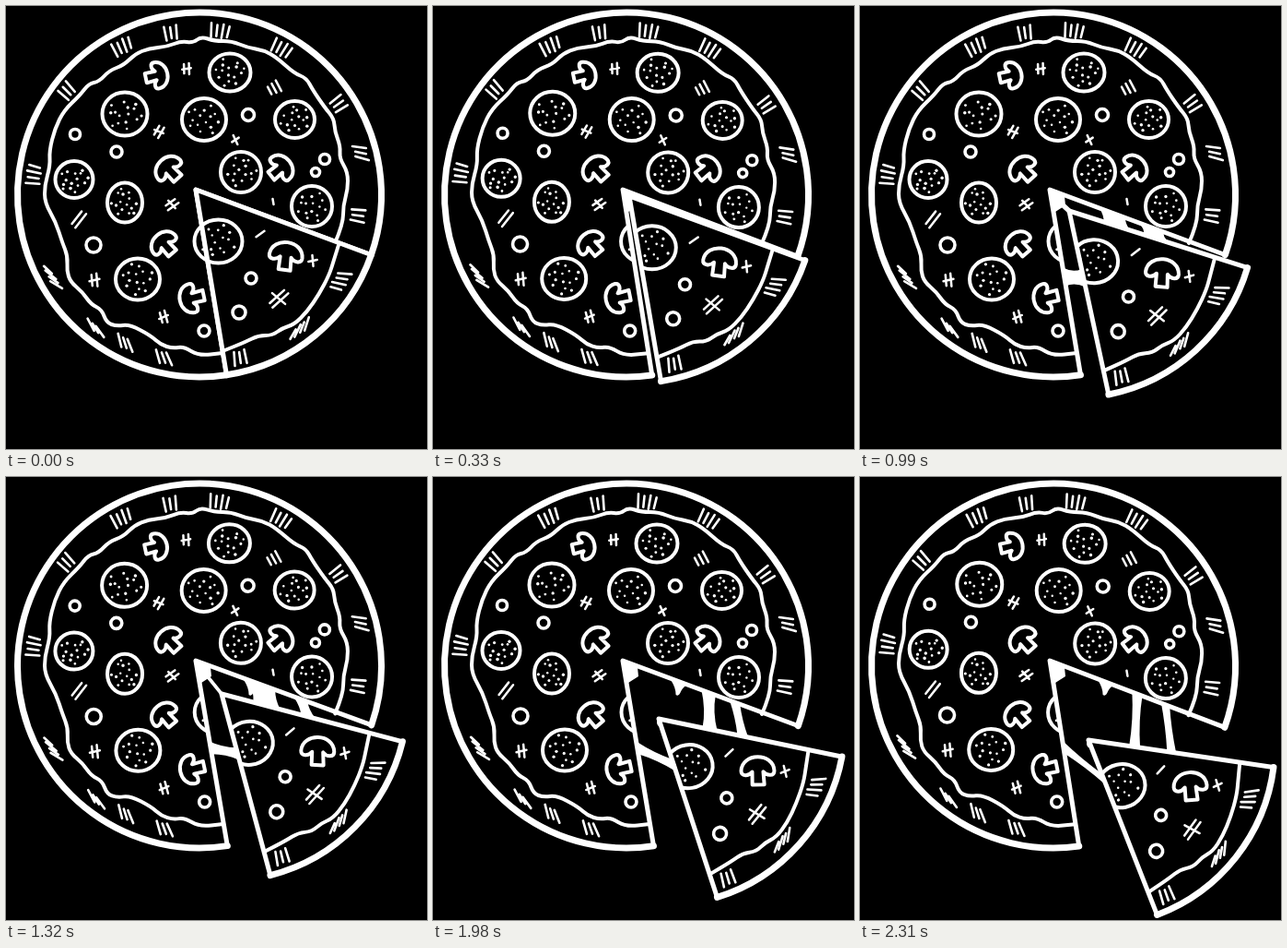
Recreate the animation shown at these times as an HTML page with a canvas. Size 457 px wide and 480 px high, loop 2640 ms.

```html
<!DOCTYPE html>
<html lang="en">
<head>
<meta charset="utf-8">
<title>Pizza slice</title>
<style>
html, body { margin: 0; width: 100%; height: 100%; overflow: hidden; background: #000; }
canvas { display: block; width: 457px; height: 480px; }
</style>
</head>
<body>
<canvas id="stage" width="457" height="480"></canvas>
<script>
const ctx = document.getElementById('stage').getContext('2d');
const STEP = 330, POSES = 8, TAU = Math.PI * 2, RAD = Math.PI / 180;
const C = [210, 204.5], R = 197.5;
const TIP = [206, 199], RIGHT = [396, 269.5], LOW = [239.5, 400];
const A_RIGHT = Math.atan2(RIGHT[1] - C[1], RIGHT[0] - C[0]);
const A_LOW = Math.atan2(LOW[1] - C[1], LOW[0] - C[0]);

// slice tip x, y, slice turn, pizza wobble (degrees)
const pose = [
  [206, 199, 0, 0], [213, 206, -0.3, 0.5], [219, 214, -1.3, -0.25], [227, 222, -2.7, 0],
  [234, 235, -5.6, -0.25], [240, 248, -7, 0], [245, 262, -8.7, 0], [248, 285, -12, 0.5]
];

const crustBody = [
  [357, 257], [366, 236], [366, 216], [371, 199], [371, 180], [362, 165], [363, 152], [357, 136],
  [356, 122], [346, 110], [333, 91], [326, 78], [313, 73], [294, 56], [280, 48], [262, 45],
  [245, 38], [226, 38], [212, 33], [203, 40], [190, 38], [175, 44], [155, 46], [140, 52],
  [128, 64], [112, 70], [101, 82], [90, 84], [80, 97], [63, 113], [53, 133], [47, 157],
  [48, 173], [42, 194], [42, 213], [54, 234], [61, 256], [67, 271], [66, 287], [70, 299],
  [83, 310], [92, 323], [104, 329], [109, 343], [120, 347], [134, 345], [157, 357], [168, 367],
  [181, 371], [193, 369], [209, 379], [235, 376]
];
const crustSlice = [
  [361, 259], [356, 275], [351, 291], [340, 312], [327, 331], [313, 345], [300, 349],
  [289, 357], [274, 357], [260, 364], [235, 374]
];

// x, y, rx, ry
const pepperoni = [
  [129, 117, 24.5, 23.5], [215, 123, 24, 23], [243, 72, 22.5, 20.5], [313.5, 123, 21.5, 20],
  [255, 180, 22, 22], [332, 217, 22, 22], [74, 188, 20.5, 20], [129, 213, 19, 21.5],
  [143, 296, 24, 22.5], [230.5, 255, 26, 23.5]
];
// x, y, radius
const rings = [
  [75, 139, 5.5], [120, 158, 6], [263, 118, 6.5], [346, 166, 5.5], [336, 180, 4.5],
  [95, 259, 8], [215, 352, 6], [266, 295, 6], [253, 332, 7]
];
// x, y, turn, scale
const mushrooms = [
  [165, 75, 78, 0.8], [176, 176, -42, 0.88], [299, 175, 52, 0.85],
  [171, 257, -40, 0.85], [200, 317, -102, 0.88], [304, 269, 8, 1]
];
// x, y, stroke angle, count
const ticks = [
  [126, 44, 66, 4], [179, 29, 82, 3], [232, 27, 96, 4], [299, 46, 118, 4], [66, 92, 45, 3],
  [361, 106, 145, 3], [385, 159, 12, 3], [382, 227, 8, 3], [30, 183, 8, 4], [50, 294, 35, 4],
  [97, 349, 58, 3], [129, 365, 72, 3], [171, 381, 70, 3],
  [363, 298, 8, 4], [319, 350, 112, 4], [254, 381, 82, 3]
];
// x, y, stroke angle, count, length, crossed
const herbs = [
  [196, 68, 88, 2, 12, 1], [291, 89, 62, 3, 13, 0], [166, 136, 120, 2, 13, 1],
  [249, 145, 65, 1, 11, 1], [180, 215, 145, 2, 14, 1], [79, 231, 128, 2, 19, 0],
  [96, 297, 85, 2, 14, 1], [171, 337, 75, 2, 13, 1], [290, 212, 80, 1, 6, 0],
  [276, 247, 145, 1, 11, 0], [333, 276, 85, 1, 12, 1], [296, 317, 138, 2, 23, 1]
];

function rng(seed) {
  return () => (seed = (seed * 16807) % 2147483647) / 2147483647;
}

function stroke(width, build) {
  ctx.lineWidth = width;
  ctx.beginPath();
  build();
  ctx.stroke();
}

function curve(pts) {
  ctx.moveTo(...pts[0]);
  for (let i = 1; i < pts.length - 1; i++) {
    const [x, y] = pts[i], [u, v] = pts[i + 1];
    ctx.quadraticCurveTo(x, y, (x + u) / 2, (y + v) / 2);
  }
  ctx.lineTo(...pts[pts.length - 1]);
}

function dash(x, y, angle, len) {
  const dx = Math.cos(angle * RAD) * len / 2, dy = Math.sin(angle * RAD) * len / 2;
  ctx.moveTo(x - dx, y - dy);
  ctx.lineTo(x + dx, y + dy);
}

function drawPepperoni([x, y, rx, ry], i) {
  stroke(4, () => ctx.ellipse(x, y, rx, ry, 0, 0, TAU));
  const rand = rng(977 * (i + 3));
  for (let n = 0; n < 15; n++) {
    const a = n * 2.4 + rand() * 0.6 + i, d = Math.sqrt((n + 0.6) / 15) * 0.78;
    ctx.beginPath();
    ctx.arc(x + Math.cos(a) * d * rx, y + Math.sin(a) * d * ry, 1.2 + rand() * 0.6, 0, TAU);
    ctx.fill();
  }
}

function drawMushroom([x, y, turn, s]) {
  ctx.save();
  ctx.translate(x, y);
  ctx.rotate(turn * RAD);
  ctx.scale(s, s);
  stroke(4 / s, () => {
    ctx.moveTo(-18, 2);
    ctx.bezierCurveTo(-17, -18, 17, -18, 18, 2);
    ctx.bezierCurveTo(18, 8, 10, 8, 6, 3);
    ctx.lineTo(7, 17);
    ctx.lineTo(-6, 17);
    ctx.lineTo(-6, 3);
    ctx.bezierCurveTo(-10, 8, -18, 8, -18, 2);
    ctx.closePath();
  });
  ctx.restore();
}

function drawTicks([x, y, angle, n]) {
  const out = Math.atan2(y - C[1], x - C[0]);
  stroke(2.6, () => {
    for (let i = 0; i < n; i++) {
      const k = (i - (n - 1) / 2) * 6.2;
      dash(x - Math.sin(out) * k, y + Math.cos(out) * k, angle + (i - 1) * 4, 15 - (i % 2) * 3);
    }
  });
}

function drawHerb([x, y, angle, n, len, crossed]) {
  stroke(2.5, () => {
    for (let i = 0; i < n; i++) {
      const k = (i - (n - 1) / 2) * 5.5;
      dash(x - Math.sin(angle * RAD) * k, y + Math.cos(angle * RAD) * k, angle, len - i * 2);
    }
    if (crossed) dash(x, y, angle + 82, len * 0.8);
  });
}

function toppings() {
  pepperoni.forEach(drawPepperoni);
  rings.forEach(([x, y, r]) => stroke(3.6, () => ctx.arc(x, y, r, 0, TAU)));
  mushrooms.forEach(drawMushroom);
  ticks.forEach(drawTicks);
  herbs.forEach(drawHerb);
}

function wedge() {
  ctx.moveTo(...RIGHT);
  ctx.lineTo(...TIP);
  ctx.lineTo(...LOW);
}

function sector() {
  wedge();
  ctx.arc(...C, R, A_LOW, A_RIGHT, true);
  ctx.closePath();
}

function drawBody(wobble) {
  ctx.save();
  ctx.translate(...C);
  ctx.rotate(wobble * RAD);
  ctx.translate(-C[0], -C[1]);
  ctx.save();
  ctx.beginPath();
  ctx.rect(0, 0, 457, 480);
  sector();
  ctx.clip('evenodd');
  toppings();
  ctx.restore();
  stroke(4, () => curve(crustBody));
  stroke(7, () => ctx.arc(...C, R, A_LOW, A_RIGHT + TAU));
  stroke(5, wedge);
  ctx.restore();
}

function drawSlice([x, y, turn]) {
  ctx.save();
  ctx.translate(x, y);
  ctx.rotate(turn * RAD);
  ctx.translate(-TIP[0], -TIP[1]);
  ctx.save();
  ctx.beginPath();
  sector();
  ctx.clip();
  ctx.fillStyle = '#000';
  ctx.fillRect(150, 150, 300, 300);
  ctx.fillStyle = '#fff';
  toppings();
  stroke(4, () => curve(crustSlice));
  ctx.restore();
  stroke(5, wedge);
  stroke(7, () => ctx.arc(...C, R, A_LOW, A_RIGHT, true));
  ctx.restore();
}

function along(a, b, t) {
  return [a[0] + (b[0] - a[0]) * t, a[1] + (b[1] - a[1]) * t];
}

function onSlice(p, [x, y, turn]) {
  const c = Math.cos(turn * RAD), s = Math.sin(turn * RAD);
  const dx = p[0] - TIP[0], dy = p[1] - TIP[1];
  return [x + dx * c - dy * s, y + dx * s + dy * c];
}

// cheese pulled between the two cut edges, thin in the middle
function strand(end, t, u, half, neck, p) {
  const len = Math.hypot(end[0] - TIP[0], end[1] - TIP[1]), w = half / len;
  const a = along(TIP, end, t - w), b = along(TIP, end, t + w);
  const c = onSlice(along(TIP, end, u + w), p), d = onSlice(along(TIP, end, u - w), p);
  const mid = (m, n, o, q) => along(along(m, n, 0.5), along(o, q, 0.5), (1 - neck) / 2);
  ctx.beginPath();
  ctx.moveTo(...a);
  ctx.lineTo(...b);
  ctx.quadraticCurveTo(...mid(b, c, a, d), ...c);
  ctx.lineTo(...d);
  ctx.quadraticCurveTo(...mid(a, d, b, c), ...a);
  ctx.fill();
}

function drip(x, y, w, h) {
  ctx.beginPath();
  ctx.moveTo(x - w, y - w * 0.4);
  ctx.quadraticCurveTo(x - w * 0.3, y + h * 0.4, x - w * 0.3, y + h);
  ctx.quadraticCurveTo(x + w * 0.1, y + h * 1.2, x + w * 0.4, y + h * 0.7);
  ctx.quadraticCurveTo(x + w * 0.5, y + h * 0.5, x + w, y + w * 0.4);
  ctx.fill();
}

function drawCheese(k, p) {
  if (k < 1) return;
  ctx.beginPath();
  ctx.moveTo(...TIP);
  ctx.lineTo(222, 206);
  ctx.lineTo(223, 216);
  ctx.lineTo(212, 223);
  ctx.fill();
  if (k < 5) stroke(10 - k * 1.6, () => {
    ctx.moveTo(213, 209);
    ctx.lineTo(p[0], p[1]);
  });
  if (k < 2) return;
  const pull = k - 4;
  const t1 = Math.min(0.5, 0.38 + 0.055 * Math.max(pull, -0.4));
  strand(RIGHT, t1, t1 - 0.04 * k + 0.03, Math.max(6, 15 - Math.max(0, pull) * 3.4), k < 5 ? 0.8 : 0.45, p);
  const t2 = 0.6 + 0.02 * pull;
  strand(RIGHT, t2, t2 - 0.03 * k, k < 4 ? 15 : Math.max(4, 8 - pull), 0.6, p);
  strand(LOW, 0.47, 0.47 - 0.035 * k, k < 4 ? 10 : 7, 0.5, p);
  if (k > 3) drip(266, 223, 8, 13);
  if (k > 4) {
    ctx.beginPath();
    ctx.arc(p[0] + 3, p[1] + 4, 5, 0, TAU);
    ctx.fill();
  }
}

function draw(now) {
  const k = Math.floor(now / STEP) % POSES, p = pose[k];
  ctx.fillStyle = '#000';
  ctx.fillRect(0, 0, 457, 480);
  ctx.fillStyle = ctx.strokeStyle = '#fff';
  ctx.lineCap = ctx.lineJoin = 'round';
  drawBody(p[3]);
  drawCheese(k, p);
  drawSlice(p);
}

const start = performance.now();
function loop() {
  draw(performance.now() - start);
  requestAnimationFrame(loop);
}
loop();
</script>
</body>
</html>
```
